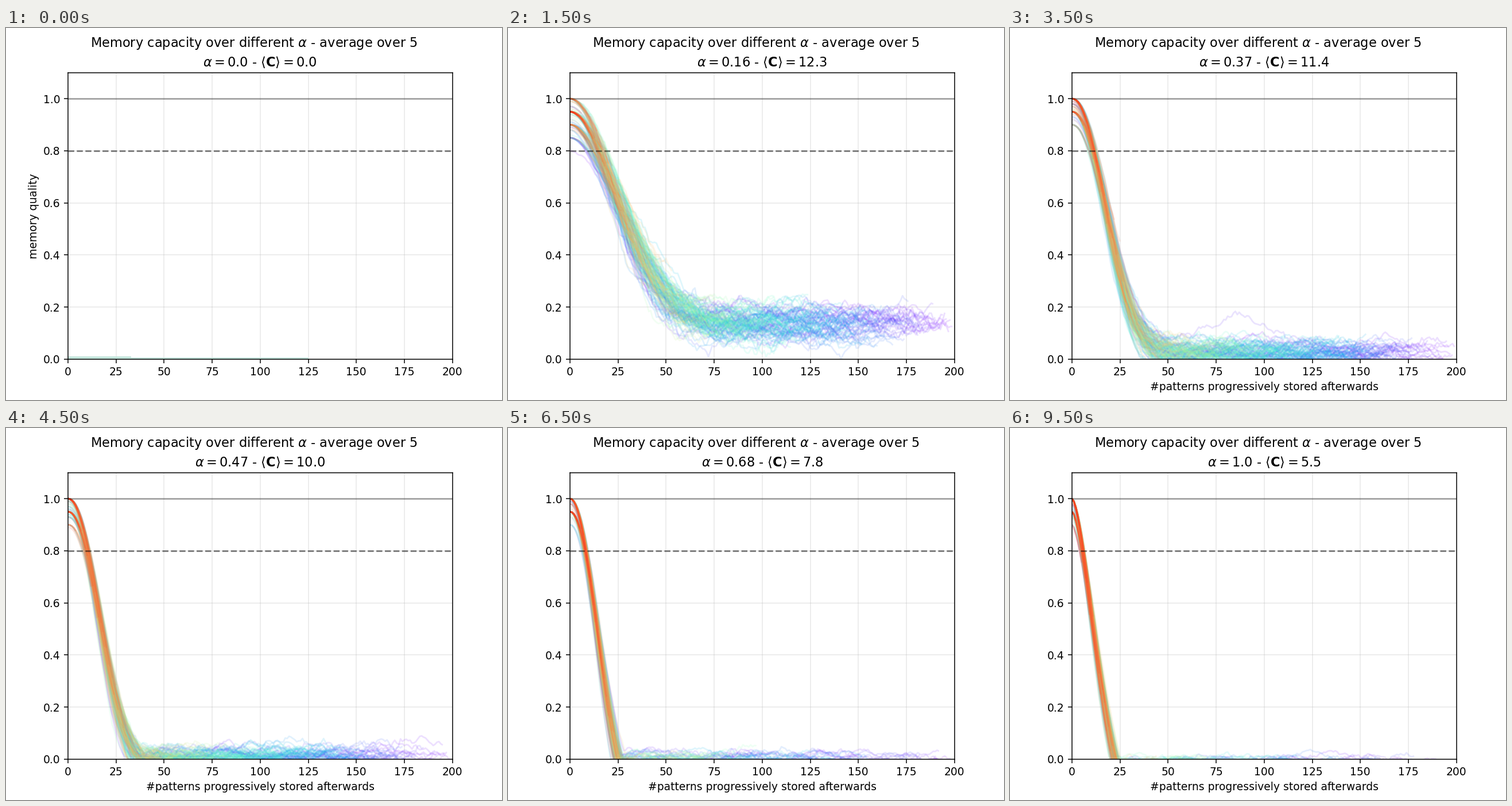
Animation of 864x648 px, one loop 10000 ms. Source, as a matplotlib script:

```python
import numpy as np
import matplotlib.pyplot as plt
from matplotlib.animation import FuncAnimation
from matplotlib.collections import LineCollection

FRAMES, INTERVAL = 20, 500
PATTERNS = 200
ALPHAS = np.linspace(0, 1, FRAMES)
# Capacity rises steeply, then falls off as learning gets faster.
CAPACITY = np.interp(np.arange(FRAMES), [0, 2, 5, 7, 11, 15, 19],
                     [0, 11.8, 13.3, 11.4, 8.6, 6.9, 5.5])


def smoothstep(t):
    t = np.clip(t, 0, 1)
    return t * t * (3 - 2 * t)


def drifting_noise(rng, count, rho=0.97):
    """Unit-variance random drift that starts at zero."""
    steps = rng.normal(size=count) * np.sqrt(1 - rho ** 2)
    drift = np.zeros(count)
    for k in range(1, count):
        drift[k] = rho * drift[k - 1] + steps[k]
    return drift


def memory_curves(alpha, seed):
    """One forgetting curve per pattern; older patterns have longer ones."""
    rng = np.random.default_rng(seed)
    start_mean = 0.98 - 0.5 * np.exp(-alpha / 0.06)
    start_spread = 0.03 + 0.02 * np.exp(-alpha / 0.2)
    early_drop = 0.25 * np.exp(-alpha / 0.12)
    width = 15 + 3.2 / alpha
    power = 2.15 - 2 * (alpha - 0.5) ** 2
    floor = 0.4 * np.exp(-alpha / 0.19) - 0.035
    base = floor - 0.28 * smoothstep((alpha - 0.35) / 0.5)
    noise = 0.02 + 0.035 * np.exp(-alpha / 0.3)

    curves = []
    for i in range(PATTERNS):
        x = np.arange(PATTERNS - i)
        start = rng.normal(start_mean, start_spread)
        start -= early_drop * np.exp(-i / 25)
        start = min(1, round(start * 20) / 20)
        if rng.random() < 0.2:
            start = min(1, start + 0.01 * rng.integers(-2, 3))
        decay = np.exp(-(x / (width * rng.normal(1, 0.05))) ** power)
        y = np.maximum(base + (start - base) * decay, floor)
        y += noise * np.minimum(1, x / 30) * drifting_noise(rng, len(x))
        curves.append(np.column_stack([x, np.minimum(y, 1)]))
    return curves


fig, ax = plt.subplots(figsize=(6.4, 4.8), dpi=135)
fig.suptitle(r"Memory capacity over different $\alpha$ - average over 5")
ax.set(xlim=(0, 200), ylim=(0, 1.1))
ax.grid(alpha=0.3)

colors = plt.get_cmap("rainbow")(np.arange(PATTERNS) / PATTERNS)
lines = LineCollection([], colors=colors, linewidths=1.5, alpha=0.13,
                       zorder=1.8)
ax.add_collection(lines)
ax.axhline(1, color="black", alpha=0.32, lw=1.5)
ax.axhline(0.8, color="black", alpha=0.5, lw=1.5, ls="--")

# Nothing is learned at a rate of zero: only a faint strip above the axis.
strip = [ax.fill_between([0, end], 0, top, color="#c4e6dc", lw=0, zorder=1.8)
         for end, top in ((125, 0.005), (110, 0.007), (33, 0.0095))]


def update(frame):
    alpha = float(ALPHAS[frame])
    lines.set_segments(memory_curves(alpha, 100 + frame) if frame else [])
    for part in strip:
        part.set_visible(frame == 0)
    ax.set_title(rf"$\alpha = {round(alpha, 2)}$ - "
                 rf"$\langle \mathbf{{C}} \rangle = {CAPACITY[frame]:.1f}$")
    # The vertical label blinks; the horizontal one arrives later and stays.
    ax.set_ylabel("memory quality" if frame % 2 == 0 else "")
    ax.set_xlabel("#patterns progressively stored afterwards"
                  if frame >= 4 else "")
    return [lines, *strip]


anim = FuncAnimation(fig, update, frames=FRAMES, interval=INTERVAL,
                     repeat=True, repeat_delay=0, blit=False)
plt.show()
```
